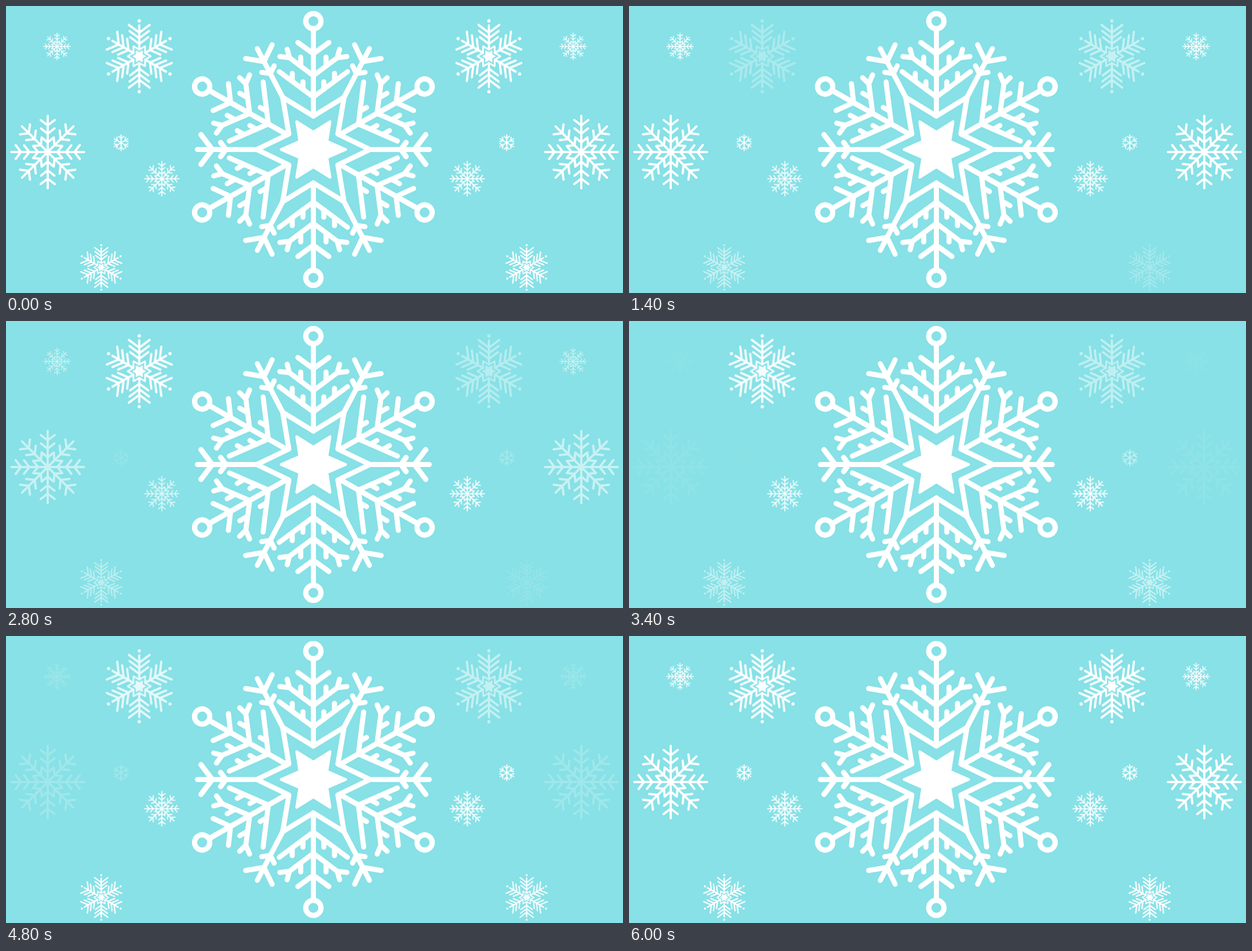
An HTML page that plays this animation: 1095 px wide and 511 px high, repeating every 6.1 s.

```html
<!DOCTYPE html>
<html lang="en">
<head>
<meta charset="utf-8">
<title>Snowflakes</title>
<style>
  html, body { margin: 0; width: 100%; height: 100%; overflow: hidden; background: #87e1e6; }
  svg { display: block; width: 100%; height: 100%; }
  .line { fill: none; stroke: #fff; stroke-linecap: round; stroke-linejoin: round; }
  .solid { fill: #fff; stroke: none; }
  .flake { animation: 6.1s linear infinite; }

  @keyframes top-left {
    13%, 19% { opacity: .42; }
    30% { opacity: .12; }
    33%, 36% { opacity: .22; }
    46%, 49% { opacity: 1; }
    65%, 85% { opacity: .8; }
  }
  @keyframes top-right {
    13%, 19% { opacity: .65; }
    33%, 36% { opacity: .22; }
    46%, 54% { opacity: .4; }
    67%, 72% { opacity: 1; }
    79%, 85% { opacity: .5; }
    86% { opacity: 1; }
  }
  @keyframes bottom-left {
    5%, 19% { opacity: .65; }
    33%, 40% { opacity: .2; }
    46%, 55% { opacity: .45; }
    67% { opacity: 1; }
  }
  @keyframes bottom-right {
    13%, 19% { opacity: .4; }
    30%, 45% { opacity: 0; }
    46%, 55% { opacity: .12; }
    56%, 78% { opacity: .68; }
    79% { opacity: 1; }
  }
  @keyframes outer {
    36% { opacity: 1; }
    46%, 49% { opacity: .55; }
    56%, 70% { opacity: .05; }
    79%, 85% { opacity: .21; }
    98% { opacity: 1; }
  }
  @keyframes inner-left {
    20% { opacity: 1; }
    33%, 36% { opacity: .5; }
    46%, 49% { opacity: .7; }
    59% { opacity: 1; }
  }
  @keyframes inner-right {
    20% { opacity: 1; }
    33%, 36% { opacity: .85; }
    46% { opacity: 1; }
  }
  @keyframes tiny-left {
    20% { opacity: 1; }
    33%, 36% { opacity: .8; }
    46%, 49% { opacity: .12; }
    56%, 70% { opacity: .04; }
    79%, 85% { opacity: .25; }
    98% { opacity: 1; }
  }
  @keyframes tiny-right {
    20% { opacity: 1; }
    33%, 36% { opacity: .35; }
    40% { opacity: .15; }
    46%, 49% { opacity: .25; }
    67%, 78% { opacity: .9; }
    79% { opacity: 1; }
  }
</style>
</head>
<body>
<svg id="stage" viewBox="0 0 1095 511">
  <defs>
    <!-- one side of an arm that ends in a ring -->
    <g id="half">
      <circle cy="-228.5" r="13.5"/>
      <path d="M0-212V-60M0-170.5L27.5-190.5M0-93.5L60.5-138.5"/>
      <path d="M0-131.5L42.5-163.5L46.5-178.5M42.5-163.5L59.5-165.5"/>
      <path d="M22.5-164.5V-149M18.5-120.5V-107"/>
    </g>
    <path id="twig" d="M37.5-135.5V-122"/>
    <path id="spur" d="M0 0H-100M-6-26.5L-26 0L-6 26.5M-41-12.5L-50 0L-41 12.5"/>
    <!-- upper right quarter of the large flake, centred on 0,0 -->
    <g id="quarter" class="line" stroke-width="9">
      <use href="#half"/>
      <use href="#twig"/>
      <g transform="rotate(60.4) translate(0 1.5)">
        <use href="#half"/>
        <use href="#twig"/>
        <use href="#half" transform="scale(-1 1)"/>
      </g>
      <use href="#spur" x="205.5"/>
      <use href="#spur" transform="translate(99.5 -179.5) rotate(-62.5)"/>
      <path d="M0-59.5L54.5-93L43.5-27.5L100.5 0"/>
      <path d="M0 0V-31L29.5-49.5L24-14.5L57 0Z" stroke-width="5" fill="#fff"/>
    </g>
  </defs>
  <g transform="translate(545.5 255.5)">
    <use href="#quarter"/>
    <use href="#quarter" transform="scale(-1 1)"/>
    <use href="#quarter" transform="scale(1 -1)"/>
    <use href="#quarter" transform="scale(-1 -1)"/>
  </g>
</svg>
<script>
const stage = document.getElementById('stage');

const range = n => [...Array(n).keys()];
const chevron = (x, tip, node) => `M${-x} ${-tip}L0 ${-node}L${x} ${-tip}`;
const line = (d, width) => `<path class="line" stroke-width="${width}" d="${d}"/>`;
const spin = (n, art) =>
  range(n).map(i => `<g transform="rotate(${i * 360 / n})">${art}</g>`).join('');

// closed zigzag: valleys on the arms, peaks halfway between them
function star(arms, valley, peak) {
  const points = range(arms * 2).map(i => {
    const r = i % 2 ? peak : valley, a = i * Math.PI / arms;
    return `${(r * Math.sin(a)).toFixed(2)} ${(-r * Math.cos(a)).toFixed(2)}`;
  });
  return `M${points.join('L')}Z`;
}

function dotted() {
  const chevrons = range(3).map(i => {
    const x = 18.5 - 1.2 * i, node = 42 - 10 * i;
    return chevron(x, node + .75 * x, node);
  });
  const arm = 'M0-12V-55' + chevrons.join('');
  return spin(6, line(arm, 3.8) + '<circle class="solid" r="2.9" cy="-63"/>') +
    line(star(6, 12, 20.5), 3) +
    `<path class="solid" d="${star(6, 7.2, 12.4)}"/>`;
}

function eightfold() {
  const arm = 'M0 0V-64.5' + chevron(12.5, 57, 47.5) + chevron(12, 42, 32.5);
  return spin(8, line(arm, 4)) + line(star(8, 17, 28), 4);
}

const tiny = () => spin(6, line('M0 0V-14' + chevron(4.6, 11.5, 7.8), 2));

function flake(art, x, y, scale, fade) {
  const g = document.createElementNS('http://www.w3.org/2000/svg', 'g');
  g.setAttribute('class', 'flake');
  g.setAttribute('transform', `translate(${x} ${y}) scale(${scale})`);
  g.style.animationName = fade;
  g.innerHTML = art;
  stage.append(g);
}

flake(dotted(), 236.5, 89.5, 1, 'top-left');
flake(dotted(), 857, 89.5, 1, 'top-right');
flake(dotted(), 169, 465.5, .63, 'bottom-left');
flake(dotted(), 924, 465.5, .63, 'bottom-right');
flake(eightfold(), 74, 260, 1, 'outer');
flake(eightfold(), 1021, 260, 1, 'outer');
flake(eightfold(), 90.5, 72, .37, 'outer');
flake(eightfold(), 1006.5, 72, .37, 'outer');
flake(eightfold(), 276.5, 307.5, .475, 'inner-left');
flake(eightfold(), 818.5, 307.5, .475, 'inner-right');
flake(tiny(), 204.3, 243.5, 1, 'tiny-left');
flake(tiny(), 888.7, 243.5, 1, 'tiny-right');
</script>
</body>
</html>
```
